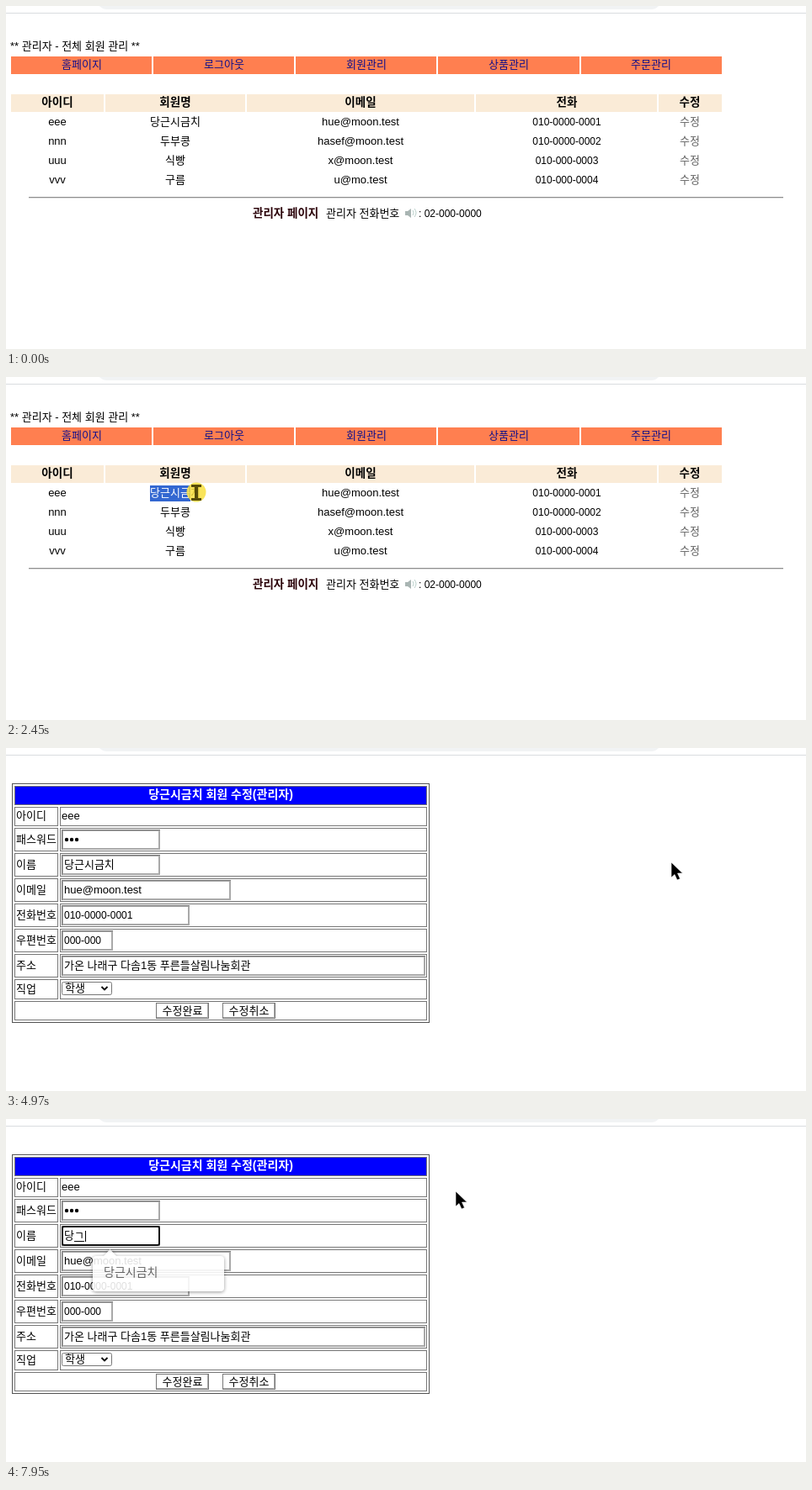
Animation, 950 px wide and 408 px high, one loop 8 s. Source, as an HTML page:

```html
<!DOCTYPE html>
<html lang="ko">
<head>
<meta charset="utf-8">
<title>회원 관리</title>
<style>
  html, body { margin: 0; width: 100%; height: 100%; overflow: hidden; background: #fff; }
  svg { display: block; width: 100%; height: 100%; }
  text { font: 13px "Liberation Sans", "Noto Sans CJK KR", "Noto Sans CJK", sans-serif; fill: #000; white-space: pre; }
  .mid { text-anchor: middle; }
  .bold { font-weight: bold; font-size: 13.5px; }
  .num { font-size: 12px; }
  .nav { fill: #10108b; }
  .link { fill: #606060; }
  .hover { fill: #62c4f2; }
  .title { fill: #fff; font-size: 14px; }
  .footer { fill: #2a0008; }
  .inverse { fill: #fff; }
  .popup text { fill: #555; font-size: 14px; }
  .cell { fill: none; stroke: #777; }
</style>
</head>
<body>
<svg id="stage" viewBox="0 0 950 408"></svg>
<script>
const LOOP = 8000, STEP = 70;
const OPEN = 4710;          // edit form replaces the list
const NAME = '당근시금치', OTHER = '두부콩';
const BLUE = '#3367d1';

const text = (x, y, s, cls = '') => `<text x="${x}" y="${y}" class="${cls}">${s}</text>`;
const mid = (x, y, s, cls = '') => text(x, y, s, 'mid ' + cls);
const box = (x1, y1, x2, y2, attrs) =>
  `<rect x="${x1}" y="${y1}" width="${x2 - x1}" height="${y2 - y1}" ${attrs}/>`;
const cell = (x1, y1, x2, y2) => box(x1 + .5, y1 + .5, x2 - .5, y2 - .5, 'class="cell"');
const during = (from, to, content, attrs = '') =>
  `<g data-from="${from}" data-to="${to}" ${attrs}>${content}</g>`;
const selection = (id, y1, y2, x, content) => `
  <clipPath id="${id}Clip">${box(x, y1, x, y2, `id="${id}"`)}</clipPath>
  <g clip-path="url(#${id}Clip)">${box(x, y1, x + 60, y2, `fill="${BLUE}"`)}${content}</g>`;

function listPage() {
  const menu = ['홈페이지', '로그아웃', '회원관리', '상품관리', '주문관리'];
  const navEdges = [6, 175, 344, 513, 683, 852];
  const heads = ['아이디', '회원명', '이메일', '전화', '수정'];
  const headEdges = [6, 118, 286, 558, 775, 852];
  const centers = [61, 201, 421, 666, 812];
  const members = [
    ['eee', NAME, 'hue@moon.test', '010-0000-0001'],
    ['nnn', OTHER, 'hasef@moon.test', '010-0000-0002'],
    ['uuu', '식빵', 'x@moon.test', '010-000-0003'],
    ['vvv', '구름', 'u@mo.test', '010-000-0004']
  ];
  const styles = ['', '', '', 'num', 'link'];
  const bar = (labels, edges, mids, y, color, cls) => labels.map((s, i) =>
    box(edges[i], y, edges[i + 1] - 2, y + 21, `fill="${color}"`) + mid(mids[i], y + 14, s, cls)).join('');
  const rows = members.map((m, r) => [...m, '수정'].map((s, i) =>
    mid(centers[i], 142 + 23 * r, s, styles[i])).join('')).join('');
  return text(5, 52, '** 관리자 - 전체 회원 관리 **')
    + bar(menu, navEdges, [90, 259, 428, 597, 766], 60, '#ff7f50', 'nav')
    + bar(heads, headEdges, centers, 105, '#faebd7', 'bold')
    + rows
    + during(3890, OPEN, box(799, 129, 826, 149, 'fill="#fff"') + mid(812, 142, '수정', 'hover'))
    + selection('rowSel', 129, 148, 171, mid(201, 142, NAME, 'inverse'))
    + box(27, 227, 923, 228, 'fill="#8f8f8f"') + box(27, 228, 923, 229, 'fill="#dcdcdc"')
    + text(293, 251, '관리자 페이지', 'bold footer') + text(380, 251, '관리자 전화번호')
    + `<path d="M474 244h3l4-3v11l-4-3h-3z" fill="#a9b5b3"/>
       <path d="M483 243q2 3 0 6M485 241q4 5 0 10" fill="none" stroke="#b9cfca"/>`
    + text(490, 251, ': 02-000-0000', 'num');
}

function field(y, right, value, cls = '') {
  return box(67, y + 1, right - 1, y + 23, 'fill="#fff" stroke="#a9a9a9" stroke-width="2"')
    + `<path d="M66.5 ${y + 24}V${y + .5}H${right}" fill="none" stroke="#777"/>`
    + text(69, y + 16, value, cls);
}

function formPage() {
  const labels = ['아이디', '패스워드', '이름', '이메일', '전화번호', '우편번호', '주소', '직업'];
  const tops = [70, 95, 125, 155, 185, 215, 245, 275, 301];
  const rows = labels.map((s, i) => {
    const top = tops[i], bottom = tops[i + 1] - 2;
    return cell(10, top, 62, bottom) + cell(64, top, 500, bottom)
      + text(12, (top + bottom) / 2 + 3.5, s);
  }).join('');
  const button = (x, s) => box(x + .5, 303.5, x + 62.5, 321.5, 'fill="#fff" stroke="#777"')
    + `<path d="M${x + 1} 320.5H${x + 61.5}V304" fill="none" stroke="#a9a9a9"/>` + mid(x + 31.5, 317, s);
  const dots = [72, 78, 84].map(x => `<circle cx="${x}" cy="109" r="2.2"/>`).join('');
  return box(7.5, 42.5, 502.5, 326.5, 'fill="#fff" stroke="#555"')
    + box(10.5, 45.5, 499.5, 67.5, 'fill="#00f" stroke="#777"')
    + mid(255, 60, NAME + ' 회원 수정(관리자)', 'bold title')
    + rows + cell(10, 301, 500, 324)
    + text(66, 85, 'eee') + field(97, 183, '') + dots
    + field(127, 183, '') + field(157, 267, 'hue@moon.test')
    + field(187, 218, '010-0000-0001', 'num') + field(217, 127, '000-000', 'num')
    + field(247, 498, '가온 나래구 다솜1동 푸른들살림나눔회관')
    + box(66.5, 278.5, 125.5, 293.5, 'rx="2" fill="#fff" stroke="#767676"') + text(70, 290, '학생')
    + '<path d="M113.5 284l3.5 3.5 3.5-3.5" fill="none" stroke="#000" stroke-width="1.8"/>'
    + button(178, '수정완료') + button(257, '수정취소')
    + nameField();
}

function popup(from, to, names, opacity) {
  const bottom = 169 + 36 * names.length;
  return during(from, to,
    `<path d="M107 163H116L123.5 155 131 163H255q4 0 4 4V${bottom - 4}q0 4-4 4H107q-4 0-4-4V167q0-4 4-4z"
      fill="#fff" style="filter:drop-shadow(0 1px 2px #0007)"/>`
    + names.map((s, i) => text(116, 187 + 34 * i, s)).join(''),
    `class="popup" opacity="${opacity}"`);
}

function nameField() {
  const typed = (from, to, done, composing) => {
    const x = 69 + 12 * done.length;
    return during(from, to, text(69, 143, done + composing)
      + box(x, 145, x + 12, 146, '') + box(x + 13, 133, x + 14, 146, ''));
  };
  return during(OPEN, 7680, text(69, 143, NAME) + selection('nameSel', 130, 148, 69, text(69, 143, NAME, 'inverse')))
    + during(5860, LOOP, box(67, 128, 182, 150, 'rx="2" fill="none" stroke="#101010" stroke-width="2"'))
    + typed(7680, 7770, '', 'ㄷ') + typed(7770, 7860, '', '다')
    + typed(7860, 7950, '', '당') + typed(7950, LOOP, '당', 'ㄱ')
    + popup(7770, 7860, [NAME, OTHER], .6) + popup(7860, 7950, [NAME, OTHER], 1)
    + popup(7950, LOOP, [NAME], .88);
}

// Pointer moves: each stop is [time, x, y]; the picture holds for STEP ms.
const moves = [
  [[580, 786, 373], [720, 570, 296], [860, 400, 256], [1000, 146, 238], [1070, 109, 205], [1140, 128, 167]],
  [[1340, 128, 165], [1550, 133, 128], [1760, 147, 115], [2040, 155, 135]],
  [[2170, 156, 136], [2310, 182, 136], [2450, 226, 137], [2590, 246, 138], [2730, 330, 148], [2870, 391, 150]],
  [[2990, 410, 149], [3200, 560, 140], [3480, 747, 128], [3550, 785, 130], [3690, 763, 128]],
  [[3820, 778, 127], [3960, 806, 127]],
  [[4160, 806, 129], [4640, 807, 134]],
  [[4970, 790, 136], [5180, 470, 140], [5390, 48, 141], [5460, 75, 142], [5600, 149, 143]],
  [[5860, 148, 143], [5930, 110, 143], [6070, 40, 145], [6140, 70, 142], [6280, 270, 128], [6490, 534, 86]]
];
const beamTimes = [[2170, 2660], [5530, 6140]];
const pressTimes = [[2170, 2660], [3610, 3690], [4430, 4570], [5860, 6140]];
const inside = (t, spans) => spans.some(([a, b]) => t >= a && t < b);
const clamp = (v, lo, hi) => Math.min(hi, Math.max(lo, v));

function pointer(t) {
  const stops = moves.findLast(m => t >= m[0][0]);
  if (!stops) return null;
  const start = stops[0][0];
  const held = start + Math.floor((t - start) / STEP) * STEP;
  const next = stops.findIndex(s => s[0] > held);
  if (next < 0) return stops.at(-1).slice(1);
  const [t0, x0, y0] = stops[next - 1], [t1, x1, y1] = stops[next];
  const k = (held - t0) / (t1 - t0);
  return [x0 + (x1 - x0) * k, y0 + (y1 - y0) * k];
}

const stage = document.getElementById('stage');
stage.innerHTML = box(0, 0, 950, 408, 'fill="#fff"')
  + box(108, -20, 778, 4, 'rx="12" fill="#f1f3f4"') + box(0, 8, 950, 9, 'fill="#dadce0"')
  + during(0, OPEN, listPage()) + during(OPEN, LOOP, formPage())
  + `<g id="pointer">
      <circle id="press" r="11.5" fill="#f8df3d" opacity=".85"/>
      <path id="arrow" d="M0 0V18L4 14.5 7 21 10.5 19.5 7.5 13H13.5Z" stroke="#fff" stroke-width=".6"/>
      <path id="beam" d="M-6-9H6v3H2V7H6v3H-6V7H-2V-6H-6z"/>
    </g>`;

const get = id => document.getElementById(id);
const timed = [...stage.querySelectorAll('[data-from]')];
const show = (el, on) => { el.style.display = on ? '' : 'none'; };

function select(id, start, end) {
  get(id).setAttribute('x', start);
  get(id).setAttribute('width', Math.max(0, end - start));
}

function draw(now) {
  const t = now % LOOP;
  timed.forEach(el => show(el, t >= +el.dataset.from && t < +el.dataset.to));

  const at = pointer(t);
  show(get('pointer'), at);
  if (at) {
    const pressed = inside(t, pressTimes), beam = inside(t, beamTimes);
    get('pointer').setAttribute('transform', `translate(${at.map(Math.round)})`);
    show(get('press'), pressed);
    show(get('beam'), beam);
    show(get('arrow'), !beam);
    get('beam').setAttribute('fill', pressed ? '#574c08' : '#000');
  }

  const x = at ? at[0] : 0;
  const rowChars = t >= 2170 && t < 3610 ? clamp(Math.floor((x - 171) / 12), 0, 5) : 0;
  select('rowSel', 171, 171 + 12 * rowChars);
  const nameFrom = t < 5860 ? 5 : t >= 6070 ? 0 : clamp(Math.round((x - 69) / 12), 0, 5);
  select('nameSel', 69 + 12 * nameFrom, 129);
  requestAnimationFrame(draw);
}
draw(performance.now());
</script>
</body>
</html>
```
